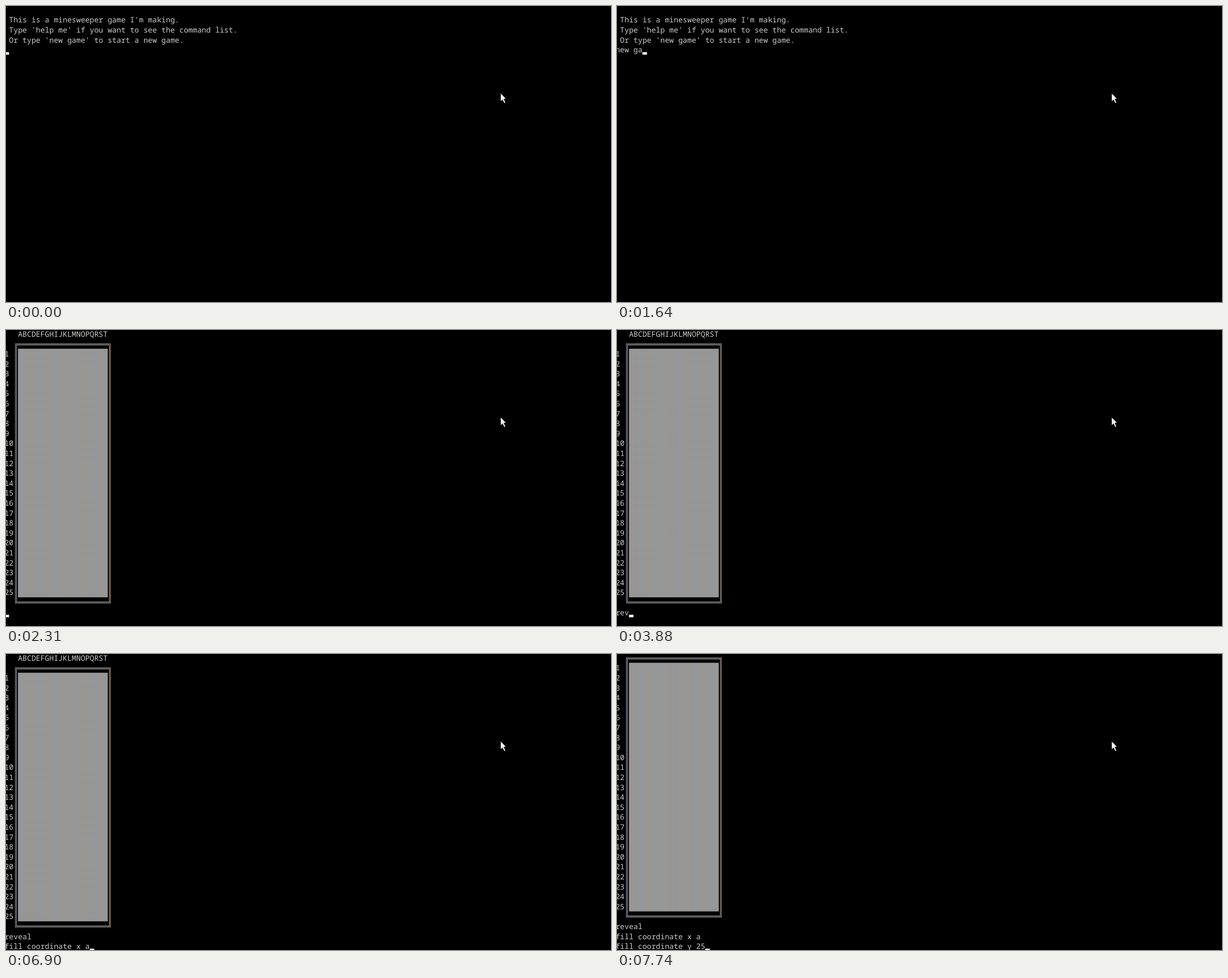
An HTML page that plays this animation: 1068 by 524 pixels, repeating every 8 s.

```html
<!DOCTYPE html>
<html lang="en">
<head>
<meta charset="utf-8">
<title>Minesweeper console</title>
<style>
  html, body { margin: 0; width: 100%; height: 100%; overflow: hidden; background: #000; }
  svg { display: block; width: 1068px; height: 524px; }
  text {
    font: 13.2px "Noto Sans Mono", "DejaVu Sans Mono", monospace;
    fill: #ccc;
    white-space: pre;
    text-rendering: geometricPrecision;
  }
</style>
</head>
<body>
<svg viewBox="0 0 1068 524">
  <defs>
    <pattern id="dots" width="2" height="2" patternUnits="userSpaceOnUse">
      <path d="M0 0h1v1h-1zM1 1h1v1h-1z" fill="#000" fill-opacity=".25"/>
    </pattern>
    <pattern id="stripes" x="21.2" width="3.96" height="8" patternUnits="userSpaceOnUse">
      <path d="M0 0h1.3v8h-1.3z" fill="#8088a0" fill-opacity=".3"/>
      <path d="M2 0h1.3v8h-1.3z" fill="#a09484" fill-opacity=".3"/>
    </pattern>
  </defs>
  <rect width="1068" height="524"/>
  <g id="board">
    <g id="field"></g>
    <g fill="none" stroke-width="1">
      <path d="M16 24.5H185M18 26.5H183M18 481.3H183M16 483.3H185" stroke="#b0b0b0"/>
      <path d="M16.5 24V483.8" stroke="#9c90b8"/>
      <path d="M18.5 26V481.8" stroke="#a8a4b8"/>
      <path d="M182.5 26V481.8" stroke="#b8aca0"/>
      <path d="M184.5 24V483.8" stroke="#b0907a"/>
    </g>
  </g>
  <g id="rows"></g>
  <rect id="cursor" width="7.92" height="4.4" fill="#fff"/>
  <path d="M873.5 155V168.4L876.6 165.4L879.8 171.8L881.4 171L878.4 164.2H882.3Z" fill="#fff"/>
</svg>
<script>
const LOOP = 8000, CELL = 7.92, LINE = 17.6, LEFT = -2.6, ROWS = 30;
const BOARD_AT = 2310;
const CLEAR = "\f";

const intro = [
  "",
  " This is a minesweeper game I'm making.",
  " Type 'help me' if you want to see the command list.",
  " Or type 'new game' to start a new game.",
  ""
].join("\n");

const numbers = Array.from({ length: 25 }, (_, i) => i + 1);
const labels = ["   ABCDEFGHIJKLMNOPQRST", "", ...numbers, "", ""].join("\n");

// Console output: [time in ms, characters written]
const output = [
  [0, intro],
  [790, "n"], [910, "e"], [1030, "w"], [1150, " "],
  [1380, "g"], [1640, "a"], [1750, "m"], [1880, "e"],
  [2240, "\n"], [2290, CLEAR + "\n".repeat(5)], [BOARD_AT, CLEAR + labels],
  [3490, "r"], [3670, "e"], [3880, "v"], [4090, "e"], [4200, "a"], [4320, "l"],
  [4740, "\n"], [4760, "fill coordinate x "], [6900, "a"],
  [7020, "\nfill coordinate y "], [7640, "2"], [7740, "5"]
];

const byId = id => document.getElementById(id);

function add(parent, tag, attrs) {
  const node = document.createElementNS("http://www.w3.org/2000/svg", tag);
  for (const name in attrs) node.setAttribute(name, attrs[name]);
  return parent.appendChild(node);
}

for (const fill of ["#b4b4b2", "url(#stripes)", "url(#dots)"]) {
  add(byId("field"), "rect", { x: 21.2, y: 33.2, width: 20 * CELL, height: 25 * LINE, fill });
}

const rows = Array.from({ length: ROWS }, (_, i) =>
  add(byId("rows"), "text", { x: LEFT, y: 11.8 + i * LINE }));

function render(time) {
  const written = output.filter(([at]) => at <= time).map(([, chars]) => chars).join("");
  const lines = written.split(CLEAR).pop().split("\n");
  const scroll = Math.max(0, lines.length - ROWS);
  rows.forEach((row, i) => {
    const line = lines[i + scroll] || "";
    if (row.textContent !== line) row.textContent = line;
  });

  const board = byId("board");
  board.setAttribute("visibility", time >= BOARD_AT ? "visible" : "hidden");
  board.setAttribute("transform", `translate(0 ${-scroll * LINE})`);

  const cursor = byId("cursor");
  cursor.setAttribute("x", LEFT + lines.at(-1).length * CELL);
  cursor.setAttribute("y", (lines.length - scroll) * LINE - 6.3);
}

const start = performance.now();
function tick() {
  render((performance.now() - start) % LOOP);
  requestAnimationFrame(tick);
}
tick();
</script>
</body>
</html>
```
